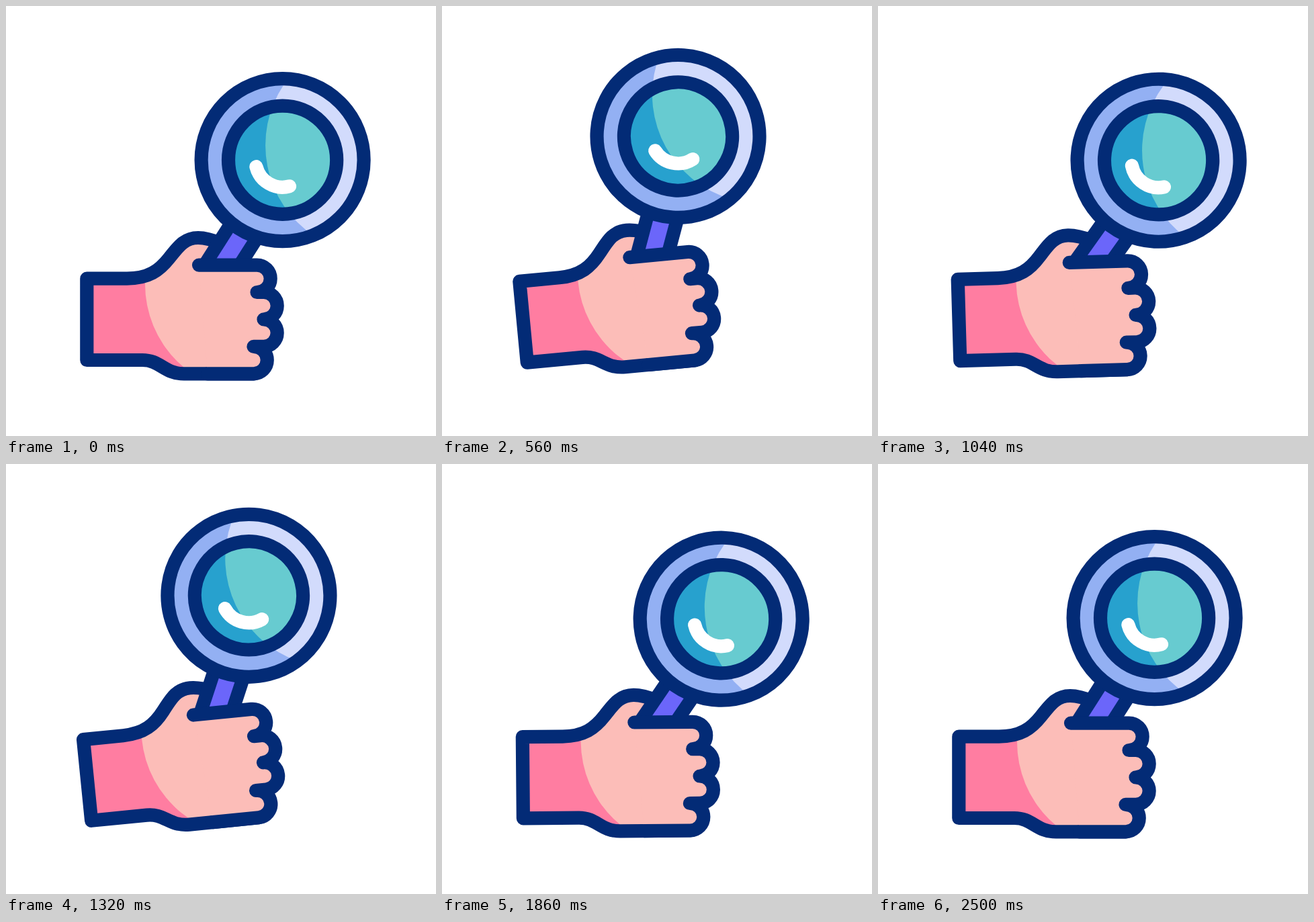
These frames come from a looping animation (640x640 px, 2620 ms). An HTML page:

```html
<!DOCTYPE html>
<html lang="en">
<head>
<meta charset="utf-8">
<title>Magnifying glass</title>
<style>
  html, body { margin: 0; height: 100%; overflow: hidden; background: #fff; }
  svg { display: block; width: 100%; height: 100%; }
  .line { fill: none; stroke: #032b76; stroke-width: 20.2; stroke-linecap: round; stroke-linejoin: round; }
</style>
</head>
<body>
<svg viewBox="0 0 640 640">
  <defs>
    <path id="wrist" d="M322 354Q300 345 286 345C265 345 256 359 243 375C228 394 212 405.7 180 405.7H120.3V527H203C230 527 235 547.3 265 547.3H369"/>
    <path id="fist" d="M287 385.6H373.5a20.2 20.2 0 0 1 0 40.4H383.5a20.2 20.2 0 0 1 0 40.4a20.2 20.2 0 0 1 0 40.4H368.5a20.2 20.2 0 0 1 0 40.5H300"/>
    <clipPath id="handClip"><use href="#wrist"/><use href="#fist"/></clipPath>
    <clipPath id="rimClip"><circle r="121"/></clipPath>
    <clipPath id="glassClip"><circle r="80.6"/></clipPath>
  </defs>
  <g id="hand">
    <g clip-path="url(#handClip)">
      <rect x="100" y="330" width="330" height="230" fill="#ff7da1"/>
      <circle cx="369" cy="414" r="162" fill="#fcbdb8"/>
    </g>
    <use href="#wrist" class="line"/>
    <g id="lens">
      <g transform="translate(411.6 229.2)">
        <g transform="rotate(32.5)">
          <rect x="-24" y="100" width="64.4" height="100" fill="#032b76"/>
          <rect x="-4" y="100" width="24.2" height="100" fill="#6b66fa"/>
        </g>
        <g clip-path="url(#rimClip)">
          <circle r="121" fill="#93b0f3"/>
          <circle cx="136.5" cy="-22" r="162" fill="#d2dbfc"/>
        </g>
        <g clip-path="url(#glassClip)">
          <circle r="80.6" fill="#27a1ce"/>
          <circle cx="136.5" cy="-22" r="162" fill="#67cbd0"/>
        </g>
        <circle r="121" class="line"/>
        <circle r="80.6" class="line"/>
        <path d="M-39.2 10A40.4 40.4 0 0 0 10.4 39.1" class="line" style="stroke:#fff"/>
      </g>
    </g>
    <use href="#fist" fill="#fcbdb8"/>
    <use href="#fist" class="line"/>
  </g>
</svg>
<script>
  const LOOP = 2620, SWING = 400, LAG = 82;
  const angles = [0, -15, 12, -9, 6, -3, 0];
  const hand = document.getElementById('hand');
  const lens = document.getElementById('lens');

  // Damped swing, eased between successive turning points.
  function swing(ms) {
    const p = Math.min(Math.max(ms / SWING, 0), angles.length - 1);
    const i = Math.min(Math.floor(p), angles.length - 2);
    const f = p - i;
    return angles[i] + (angles[i + 1] - angles[i]) * f * f * (3 - 2 * f);
  }

  function draw() {
    const t = performance.now() % LOOP;
    hand.setAttribute('transform', `rotate(${swing(t)} 162 460.5)`);
    lens.setAttribute('transform', `rotate(${swing(t - LAG)} 318 388)`);
    requestAnimationFrame(draw);
  }
  draw();
</script>
</body>
</html>
```
